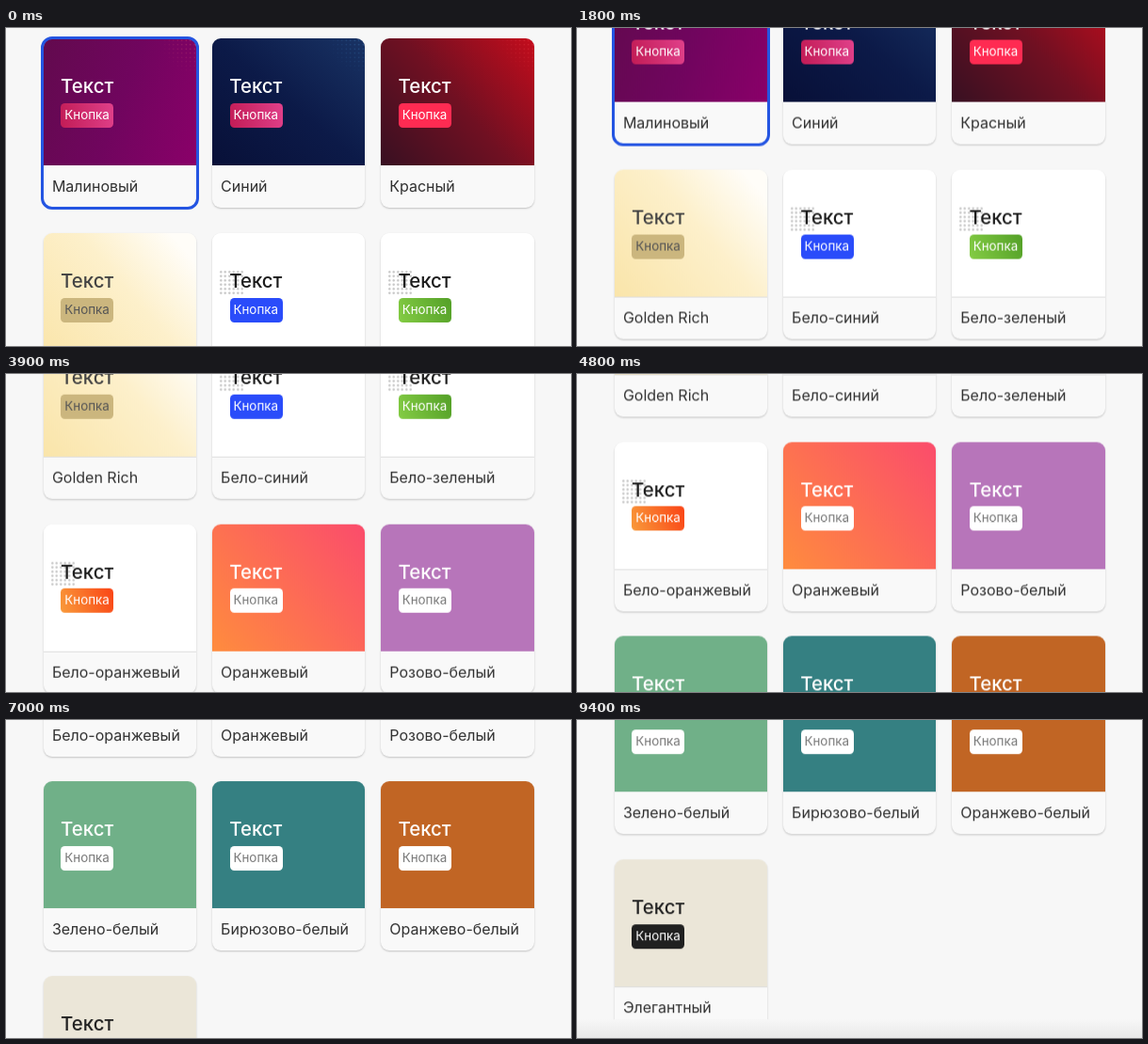
Recreate the animation shown at these times as an HTML page. Size 600 by 338 pixels, loop 9.5 s.

```html
<!DOCTYPE html>
<html lang="ru">
<head>
<meta charset="utf-8">
<style>
html, body { margin: 0; width: 100%; height: 100%; overflow: hidden; background: #f7f7f7; }
body { position: relative; font-family: Inter, sans-serif; font-optical-sizing: none; }
#page { position: absolute; left: 0; top: 0; width: 600px; height: 1030px; will-change: transform; }
#page::after {
  content: ""; position: absolute; left: 0; top: 1008px; width: 600px; height: 22px;
  background: linear-gradient(#f7f7f7, #e7e7e7);
}
.card {
  position: absolute; width: 162.5px; height: 180px; border-radius: 9px;
  background: #f9f9f9; box-shadow: 0 1px 2px rgba(0, 0, 0, .22);
}
.card * { position: absolute; white-space: nowrap; }
.selected::after {
  content: ""; position: absolute; inset: -2.5px -2.5px -2px;
  border: 3.4px solid #2455e2; border-radius: 12px; box-sizing: border-box;
  inset: -2.4px;
}
.cover { left: 0; top: 0; width: 100%; height: 135px; border-radius: 9px 9px 0 0; }
.line { box-shadow: 0 1px #dedede; }
.title { left: 18.4px; top: 41px; font-size: 20.4px; font-weight: 450; line-height: 20px; }
.button {
  left: 18.8px; top: 68.8px; width: 56px; height: 26.2px; border-radius: 4.5px;
  font-size: 13.4px; line-height: 24.6px; text-indent: 3.8px;
}
.name { left: 9.2px; top: 147px; font-size: 16px; line-height: 20px; color: #303030; }
.dots {
  left: 7px; top: 39px; width: 27px; height: 27px;
  background: radial-gradient(circle, #c6c6c6 1px, transparent 1.4px) 0 0 / 4.5px 4.5px;
}
.corner {
  right: 0; top: 0; width: 40px; height: 40px; border-radius: 0 9px 0 0; opacity: .5;
  background: radial-gradient(circle, currentColor .5px, transparent 1px) 0 0 / 4.5px 4.5px;
  -webkit-mask: radial-gradient(circle at top right, #000, transparent 40px);
  mask: radial-gradient(circle at top right, #000, transparent 40px);
}
</style>
</head>
<body>
<div id="page"></div>
<script>
const WHITE = '#fff', BLACK = '#1c1c1c', GRAY = '#777';
const PINK = 'linear-gradient(80deg, #c21c56, #e0408a)';

// name, cover, title colour, button, button text, extras
const themes = [
  ['Малиновый', 'linear-gradient(110deg, #620a4e, #70055e 50%, #8a0069)', WHITE, PINK, WHITE, { corner: '#f0707a' }],
  ['Синий', 'linear-gradient(40deg, #081038, #0c1a48 50%, #193364)', WHITE, PINK, WHITE, { corner: '#4a9ae0' }],
  ['Красный', 'linear-gradient(50deg, #381022, #701022 50%, #c40c1c)', WHITE, '#ff2b52', WHITE, { corner: '#ff5a60' }],
  ['Golden Rich', 'linear-gradient(50deg, #fae5aa, #fdf0cb 55%, #fffdf8 90%)', '#444', '#cbb67e', '#555', { line: true }],
  ['Бело-синий', WHITE, BLACK, '#2a4cfa', WHITE, { dots: true }],
  ['Бело-зеленый', WHITE, BLACK, 'linear-gradient(70deg, #84cc44, #54a028)', WHITE, { dots: true }],
  ['Бело-оранжевый', WHITE, BLACK, 'linear-gradient(70deg, #f99a3a, #fa4416)', WHITE, { dots: true }],
  ['Оранжевый', 'linear-gradient(50deg, #ff8c3e, #fb4c6c)', WHITE, WHITE, GRAY, {}],
  ['Розово-белый', '#b775ba', WHITE, WHITE, GRAY, {}],
  ['Зелено-белый', '#70b088', WHITE, WHITE, GRAY, {}],
  ['Бирюзово-белый', '#358082', WHITE, WHITE, GRAY, {}],
  ['Оранжево-белый', '#c16524', WHITE, WHITE, GRAY, {}],
  ['Элегантный', '#ebe6d8', '#222', '#202020', WHITE, { line: true }],
];

const page = document.getElementById('page');

function add(parent, className, style = {}, text = '') {
  const el = document.createElement('div');
  el.className = className;
  el.textContent = text;
  Object.assign(el.style, style);
  return parent.appendChild(el);
}

themes.forEach(([name, cover, color, button, buttonColor, extra], i) => {
  const card = add(page, i ? 'card' : 'card selected', {
    left: 39.7 + 179.2 * (i % 3) + 'px',
    top: 11 + 206.75 * Math.floor(i / 3) + 'px',
  });
  add(card, extra.line || extra.dots ? 'cover line' : 'cover', { background: cover });
  if (extra.corner) add(card, 'corner', { color: extra.corner });
  if (extra.dots) add(card, 'dots');
  add(card, 'title', { color }, 'Текст');
  add(card, 'button', { background: button, color: buttonColor }, 'Кнопка');
  add(card, 'name', {}, name);
});

// Constant acceleration, steady scroll, constant deceleration.
const DURATION = 9.5, SPEED = 97, DISTANCE = 690, SPEED_UP = 2.33, SLOW_DOWN = 2.44;

function scrollAt(t) {
  const left = DURATION - t;
  if (t < SPEED_UP) return SPEED * t * t / (2 * SPEED_UP);
  if (left < SLOW_DOWN) return DISTANCE - SPEED * left * left / (2 * SLOW_DOWN);
  return SPEED * (t - SPEED_UP / 2);
}

const start = performance.now();

function draw() {
  const ms = Math.max(0, performance.now() - start) % (DURATION * 1000);
  const t = Math.floor(ms / 100) / 10;
  page.style.transform = `translateY(${-scrollAt(t)}px)`;
  requestAnimationFrame(draw);
}
draw();
</script>
</body>
</html>
```
